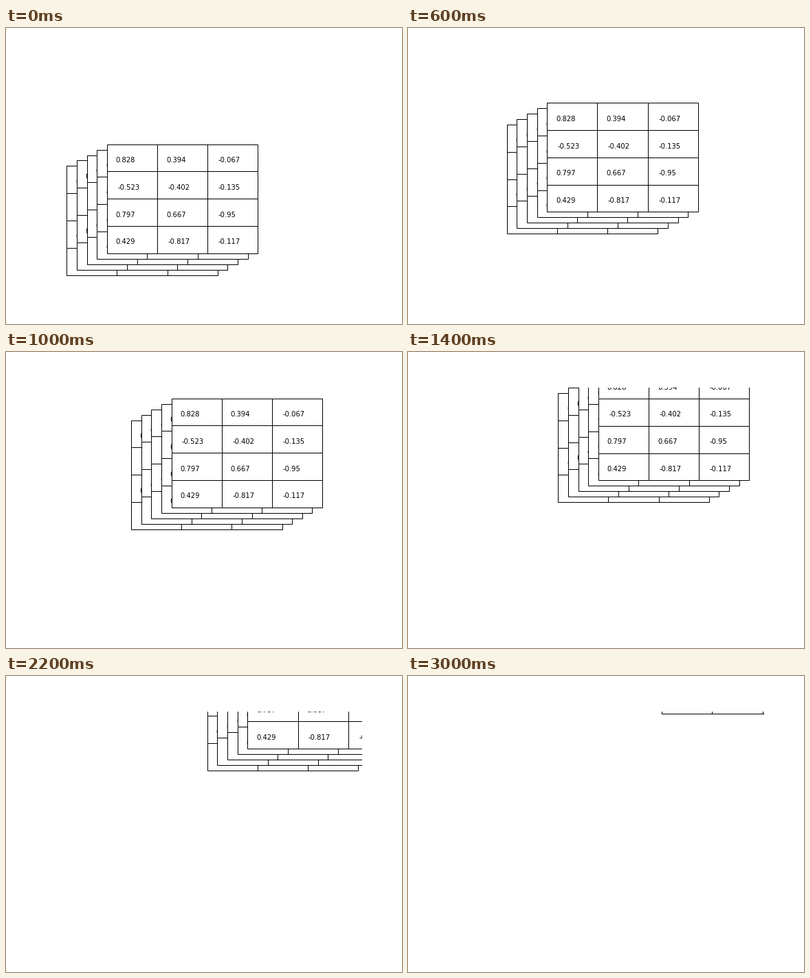
A matplotlib script for the animation above (3.1 s loop, 576 by 432 pixels).

```python
import numpy as np
import matplotlib.pyplot as plt
from matplotlib.animation import FuncAnimation
from matplotlib.patches import Rectangle
from matplotlib.transforms import Affine2D

FRAMES, INTERVAL = 31, 100
ROWS, COLS, CARDS = 4, 3, 5
CELL_W, CELL_H = 73.18, 39.77
LEFT, BOTTOM = 88.3, 360.53        # lower left corner of the rearmost card
STACK_X, STACK_Y = CELL_W / 5, CELL_H / 5
TICKS = 4.9                        # small drift steps per frame
TICK_X, TICK_Y = 1.9116, 2.08      # pixels per drift step, right and up

FRONT_TEXT = """0.828 0.394 -0.067
-0.523 -0.402 -0.135
0.797 0.667 -0.95
0.429 -0.817 -0.117"""

rng = np.random.default_rng(4)

plt.rcParams["font.family"] = "DejaVu Sans"
fig = plt.figure(figsize=(8, 6), dpi=72, facecolor="white")
ax = fig.add_axes([0.125, 0.11, 0.775, 0.77])
ax.set_xlim(72, 518.4)
ax.set_ylim(384.48, 51.84)         # pixel coordinates, y pointing down
ax.axis("off")

shift = Affine2D()
moving = shift + ax.transData


def hidden_label(depth, row):
    """Random value; odd rows are negative except on the card just behind the front."""
    sign = "-" if row % 2 and depth < CARDS - 2 else ""
    return f"{sign}{rng.uniform(0.1, 1):.3f}"


def draw_cell(x, y, label, depth):
    ax.add_patch(Rectangle((x, y), CELL_W, CELL_H, fc="white", ec="black", lw=1,
                           transform=moving, zorder=2 * depth + 1))
    indent = 15.4 if label.startswith("-") else 12.9
    ax.text(x + indent, y + CELL_H - 13.3, label, fontsize=10,
            transform=moving, clip_on=True, zorder=2 * depth + 2)


front = [line.split() for line in FRONT_TEXT.splitlines()]
for depth in range(CARDS):
    left = LEFT + depth * STACK_X
    top = BOTTOM - depth * STACK_Y - ROWS * CELL_H
    for row in range(ROWS):
        for col in range(COLS):
            label = front[row][col] if depth == CARDS - 1 else hidden_label(depth, row)
            draw_cell(left + col * CELL_W, top + row * CELL_H, label, depth)


def update(i):
    ticks = int(i * TICKS + 1e-6)
    shift.clear().translate(ticks * TICK_X, -ticks * TICK_Y)
    return []


anim = FuncAnimation(fig, update, frames=FRAMES, interval=INTERVAL,
                     init_func=lambda: update(0), repeat=True, repeat_delay=0)
plt.show()
```
